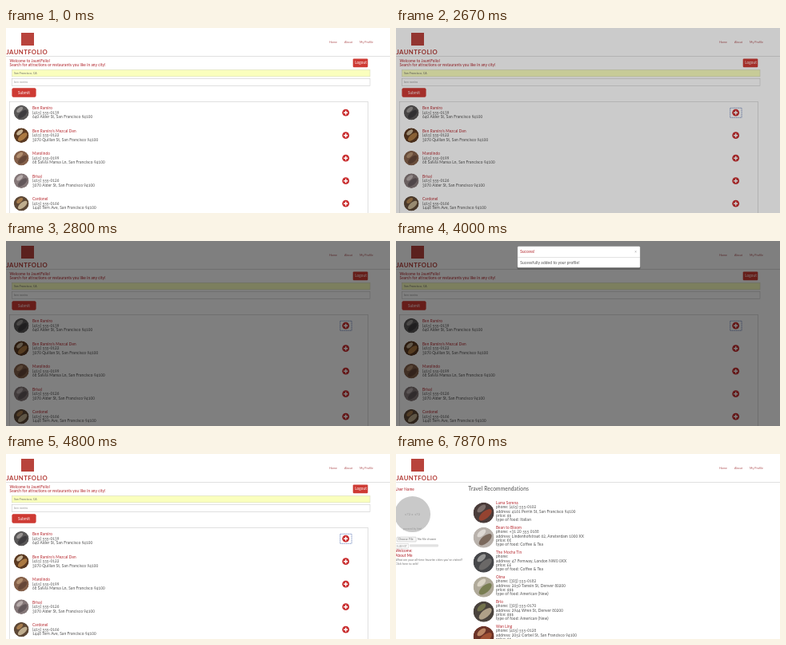
Recreate the animation shown at these times as an HTML page. Size 480 by 232 pixels, loop 8 s.

```html
<!DOCTYPE html>
<html lang="en">
<head>
<meta charset="utf-8">
<title>City search</title>
<style>
  html, body { margin: 0; width: 100%; height: 100%; overflow: hidden; background: #fff; }
  svg { display: block; width: 480px; height: 232px; }
  text { font: 4.85px Lato, "Open Sans", sans-serif; font-variant-numeric: oldstyle-nums; letter-spacing: .025em; fill: #4c4c4c; white-space: pre; }
  .head { font-size: 4.65px; font-weight: 500; fill: #b32a30; }
  .name { font-size: 4.7px; fill: #b5242b; }
  .nav { font-size: 3.6px; fill: #b05457; }
  .small { font-size: 3.5px; fill: #6a6a6a; }
  .pale { fill: #969696; }
  .white { font-size: 4.7px; fill: #fff; }
  .title { font-size: 6.6px; }
  .brand { font-size: 7.7px; font-weight: 700; letter-spacing: .4px; fill: #b23a34; }
  .button { fill: #ce3a33; }
  .button.hover { fill: #bd302c; }
  .line { fill: none; stroke: #cbcbcb; stroke-width: .6; }
</style>
</head>
<body>
<svg id="stage" viewBox="0 0 480 232"></svg>
<script>
const LOOP = 8000;
let clips = 0;

const text = (x, y, s, cls = "", extra = "") => `<text x="${x}" y="${y}" class="${cls}" ${extra}>${s}</text>`;
const rect = (x, y, w, h, attrs) => `<rect x="${x}" y="${y}" width="${w}" height="${h}" ${attrs}/>`;
const group = (id, body) => `<g id="${id}">${body}</g>`;

// Round picture: a base tone with two soft patches
function photo(x, y, r, [base, mid, light]) {
  const id = "clip" + clips++;
  return `<clipPath id="${id}"><circle cx="${x}" cy="${y}" r="${r}"/></clipPath>
    <g clip-path="url(#${id})"><circle cx="${x}" cy="${y}" r="${r}" fill="${base}"/>
    <g opacity=".8" transform="rotate(-40 ${x} ${y})">
    <ellipse cx="${x}" cy="${y + r * .25}" rx="${r * .75}" ry="${r * .35}" fill="${mid}"/>
    <ellipse cx="${x + r * .1}" cy="${y - r * .45}" rx="${r * .5}" ry="${r * .25}" fill="${light}"/></g></g>`;
}

const places = [
  ["Ben Ramiro", "(415) 555-0139", "640 Alder St, San Francisco 94100", ["#5a5858", "#38363a", "#a8a4a2"]],
  ["Ben Ramiro's Mezcal Den", "(415) 555-0122", "3070 Quillan St, San Francisco 94100", ["#5b3a22", "#c08a4c", "#e0cfae"]],
  ["Marolindo", "(415) 555-0199", "68 Salvia Mansa Ln, San Francisco 94100", ["#84604a", "#5f4234", "#bd9a78"]],
  ["Brisal", "(415) 555-0126", "3070 Alder St, San Francisco 94100", ["#857879", "#5b5054", "#c3b9b8"]],
  ["Cardonel", "(415) 555-0166", "1448 Tern Ave, San Francisco 94100", ["#5d4836", "#d9c7a6", "#b98a55"]],
];

const tips = [
  ["Luma Serena", "(415) 555-0102", "4161 Perrin St, San Francisco 94100", "$$", "Italian", ["#4a3c3a", "#a8452f", "#8a7c78"]],
  ["Bean to Bloom", "+31 20 555 0188", "Lindenhofstraat 62, Amsterdam 1000 XX", "€€", "Coffee &amp; Tea", ["#b9b2ac", "#6b5548", "#e6e2de"]],
  ["The Mocha Tin", "", "47 Fernway, London NW0 0XX", "££", "Coffee &amp; Tea", ["#46474a", "#74716f", "#a8a8a6"]],
  ["Olma", "(303) 555-0182", "2650 Tamsin St, Denver 80200", "$$$", "American (New)", ["#b0aa9a", "#6c7440", "#e5dfd0"]],
  ["Brio", "(303) 555-0170", "2944 Wren St, Denver 80200", "$$$", "American (New)", ["#4a433d", "#c8b89c", "#7d8050"]],
  ["Wan Ling", "(415) 555-0128", "2052 Corbel St, San Francisco 94100", "$$", "Chinese", ["#6b3327", "#b05a38", "#cf9a73"]],
];

const header =
  rect(19, 6, 16, 16, 'fill="#b8433c"') +
  text(.5, 32.7, "JAUNTFOLIO", "brand") +
  text(404, 19, "Home", "nav") + text(423, 19, "About", "nav") +
  text(442, 19, "My Profile", "nav", 'id="profileLink"') +
  '<path class="line" d="M0 35.5H480"/>';

const searchPage =
  text(4.5, 42.7, "Welcome to JauntFolio!", "head") +
  text(4.5, 48.2, "Search for attractions or restaurants you like in any city!", "head") +
  rect(433.7, 38.4, 18.6, 10.8, 'rx="1.2" class="button"') + text(436.2, 45.3, "Logout", "white") +
  rect(7.5, 52.5, 447.5, 8.4, 'fill="#faffbd" stroke="#d2d4b4" stroke-width=".5"') +
  text(10, 58, "San Francisco, CA", "small") +
  rect(7.5, 63.5, 447.5, 8.8, 'class="line"') + text(10, 69.2, "ben ramiro", "small pale") +
  rect(7.4, 75.2, 30.2, 11.6, 'rx="2" class="button" id="submit"') + text(15, 82.6, "Submit", "white") +
  rect(4.5, 92.5, 448, 160, 'class="line"') +
  places.map(([name, phone, address, tones], i) => {
    const y = 106.2 + 28.5 * i;
    return photo(19.2, y, 9.4, tones) +
      text(33, y - 4, name, "name") + text(33, y + 1.6, phone) + text(33, y + 7, address) +
      `<circle cx="424.7" cy="${y}" r="4.4" fill="#c92f30"/>
       <path d="M422.2 ${y}h5M424.7 ${y - 2.5}v5" stroke="#fff" stroke-width="1.5"/>`;
  }).join("") +
  rect(417.7, 100.3, 14.4, 12, 'id="focus" fill="none" stroke="#5a74b4" stroke-width=".7" stroke-dasharray="1.2 .5"');

const profilePage =
  text(-.8, 46, "User Name", "head") +
  '<circle cx="20.6" cy="75.6" r="22.5" fill="#c9c9c9"/>' +
  text(20.5, 77.2, "172 x 172", "pale", 'text-anchor="middle" style="font-size:4.4px"') +
  text(20.5, 95, "powered by html", "small pale", 'text-anchor="middle" style="font-size:3px"') +
  rect(1.2, 104.2, 24, 5.8, 'rx=".8" fill="#f6f6f6" stroke="#b0b0b0" stroke-width=".5"') +
  text(2.8, 108.3, "Choose File", "small") + text(27, 108.3, "No file chosen", "small") +
  rect(-1, 112.6, 16.2, 5.6, 'class="line"') + text(.4, 116.8, "SUBMIT", "small pale") +
  rect(17, 113.2, 36, 3.2, 'rx="1" fill="#e2e2e2"') +
  text(-.8, 123, "Welcome:", "head") + text(-.8, 128.5, "About Me", "head") +
  text(-.8, 133.9, "What are your all-time favorite cities you've visited?", "small") +
  text(-.8, 139, "Click here to edit!", "small") +
  text(90.3, 46.4, "Travel Recommendations", "title");

const rowY = i => 63 + 31 * i;
const tipNames = tips.map(([name], i) => text(125, rowY(i), name, "name")).join("");
const tipDetails = tips.map(([, phone, address, price, food, tones], i) =>
  photo(109.6, rowY(i) + 10.8, 13, tones) +
  ["phone: " + phone, "address: " + address, "price: " + price, "type of food: " + food]
    .map((s, k) => text(125, rowY(i) + 5.4 + 5.1 * k, s)).join("")
).join("");

const modal =
  rect(151.5, 8, 154, 27.5, 'rx="1.5" fill="#000" opacity=".25"') +
  rect(151.7, 6.6, 153.6, 27, 'rx="1.5" fill="#fff" stroke="#666" stroke-width=".4"') +
  '<path class="line" d="M152 20.6H305"/>' +
  text(155.3, 15.2, "Success!", "head") + text(298.3, 15, "×", "pale") +
  text(155.3, 28.8, "Sucessfully added to your profile!");

document.getElementById("stage").innerHTML =
  rect(0, 0, 480, 232, 'fill="#fff"') + header +
  group("search", searchPage) + group("profile", profilePage) +
  group("tipNames", tipNames) + group("tipDetails", tipDetails) +
  rect(0, 0, 480, 232, 'id="backdrop"') + group("modal", modal);

const el = id => document.getElementById(id);
const show = (id, on) => el(id).setAttribute("visibility", on ? "visible" : "hidden");
const ramp = (t, start, length) => Math.min(1, Math.max(0, (t - start) / length));
const easeOut = p => 1 - (1 - p) ** 2;

function draw(t) {
  show("search", t < 5930);
  show("profile", t >= 5995);
  show("tipNames", t >= 7665);
  show("tipDetails", t >= 7865);
  show("focus", t >= 2530 && t < 4870);
  el("submit").classList.toggle("hover", t >= 1470 && t < 2530);
  el("profileLink").style.fill = t >= 4870 && t < 5930 ? "#7d2528" : "";

  el("backdrop").setAttribute("opacity", .5 * (ramp(t, 2610, 150) - ramp(t, 4240, 150)));
  const slide = easeOut(ramp(t, 2810, 300)) - easeOut(ramp(t, 4002, 240));
  el("modal").setAttribute("opacity", ramp(t, 2810, 150) - ramp(t, 4002, 150));
  el("modal").setAttribute("transform", `translate(0 ${-6.8 * (1 - slide)})`);
}

const start = performance.now();
function tick() {
  draw((performance.now() - start) % LOOP);
  requestAnimationFrame(tick);
}
tick();
</script>
</body>
</html>
```
